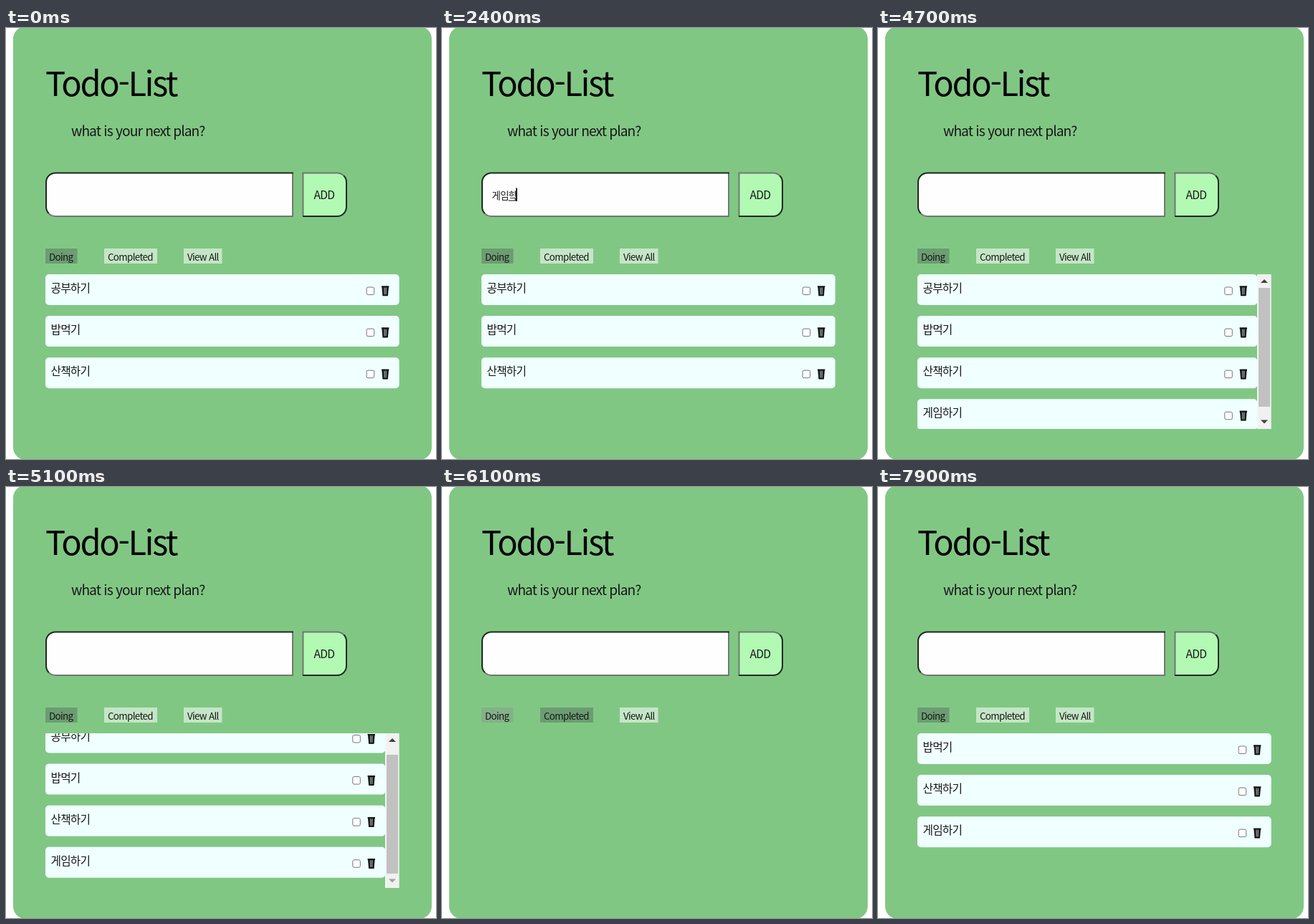
Write an HTML page that moves like this. It is 600 px wide and 602 px high and loops after 8 s.

```html
<!DOCTYPE html>
<html lang="ko">
<head>
<meta charset="utf-8">
<style>
html, body { margin: 0; width: 100%; height: 100%; overflow: hidden; background: #fff; }
svg { display: block; width: 600px; height: 602px; }
text {
  font: 300 15.7px "Noto Sans CJK KR", "Noto Sans KR", "Noto Sans CJK JP", "Noto Sans", sans-serif;
  letter-spacing: -.05em; fill: #181818; white-space: pre;
}
.title { font-size: 47px; font-weight: 400; fill: #050505; }
.sub { font-size: 19.2px; }
.tab, #typed { font-size: 13.4px; }
.line { fill: none; stroke-width: 2; }
.dark { stroke: #1c2a1d; }
.soft { stroke: #707870; }
</style>
</head>
<body>
<svg viewBox="0 0 600 602">
  <defs>
    <clipPath id="view"><rect x="50" y="344" width="500" height="216"/></clipPath>
    <filter id="blur" x="-5%" y="-200%" width="110%" height="500%"><feGaussianBlur stdDeviation="1.1"/></filter>
    <g id="tools">
      <rect x="-45.5" y="18" width="10.5" height="10.5" rx="2" fill="#fff" stroke="#767676"/>
      <path d="M-24.5 16.5H-14.5L-15.7 30H-23.3Z" fill="#3c423f"/>
      <path d="M-24.7 17.3H-14.3M-23 29.5H-16M-23 18L-22 29M-16 18L-17 29" stroke="#0c0f0d" stroke-width="1.6"/>
      <path d="M-20.6 19V28M-18.4 19V28" stroke="#a9b5b1" stroke-width=".8"/>
    </g>
  </defs>

  <rect x="10" y="-2" width="584" height="605" rx="17" fill="#81c784"/>
  <path d="M203 -1H393" stroke="#182018" stroke-width="4" stroke-dasharray="21 2 9 2 14 1" filter="url(#blur)"/>
  <text class="title" x="55" y="95">Todo-List</text>
  <text class="sub" x="91" y="151">what is your next plan?</text>

  <path d="M401 202V264H69A13 13 0 0 1 56 250V215A13 13 0 0 1 69 202Z" fill="#fffefe"/>
  <path class="line soft" d="M400 203V263H69A13 13 0 0 1 59.8 259.2"/>
  <path class="line dark" d="M59.8 259.2A13 13 0 0 1 56 250V215.5A13 13 0 0 1 69 202.5H401"/>
  <path d="M414 202H462A13 13 0 0 1 475 215V250A13 13 0 0 1 462 263H414Z" fill="#b2fab4"/>
  <path class="line soft" d="M414.5 263V202.5H462A13 13 0 0 1 471.2 206.3"/>
  <path class="line dark" d="M471.2 206.3A13 13 0 0 1 475 215.5V250A13 13 0 0 1 462 263H414"/>
  <text x="429.5" y="239">ADD</text>

  <text id="typed" x="69.5" y="238.5"></text>
  <rect id="under" y="240.5" width="11" height="1" fill="#111"/>
  <rect id="caret" y="223.5" width="1.7" height="18.5" fill="#000"/>

  <rect id="doing" x="55" y="308" width="44.5" height="21"/>
  <rect id="done" x="137" y="308" width="74" height="21"/>
  <rect x="248" y="308" width="53.5" height="21" fill="#c5e6c6"/>
  <text class="tab" x="60" y="324.8">Doing</text>
  <text class="tab" x="142" y="324.8">Completed</text>
  <text class="tab" x="253" y="324.8">View All</text>

  <g clip-path="url(#view)"><g id="list"></g></g>
  <g id="bar">
    <rect x="529.3" y="344" width="19.4" height="216" fill="#f1f1f1"/>
    <path d="M529.8 344V560" stroke="#fff"/>
    <rect id="thumb" x="531" width="16" height="166" fill="#c1c1c1"/>
    <path id="up" d="M534 356L539 351L544 356Z"/>
    <path id="down" d="M534 547.5L539 552.5L544 547.5Z"/>
  </g>
</svg>
<script>
const LOOP = 8000, ADD = 2900, BLUR = 4600, EMPTY = 6000, BACK = 6500, REMOVE = 7500;
const PLANS = ["공부하기", "밥먹기", "산책하기", "게임하기"];
const KEYS = [[1150, "ㄱ"], [1350, "게"], [1530, "겡"], [1700, "게이"], [1850, "게임"],
  [2050, "게임ㅎ"], [2200, "게임하"], [2400, "게임학"], [2550, "게임하기"]];
const DARK = [108, 157, 114], LIGHT = [197, 230, 198];
const FOCUS = 700, MAX_SCROLL = 15.5, PITCH = 58.1, FADE = 370, CHAR = 11.6;

const $ = id => document.getElementById(id);
const set = (id, name, value) => $(id).setAttribute(name, value);
const show = (id, on) => set(id, "visibility", on ? "visible" : "hidden");
const ramp = (t, start, length) => Math.min(1, Math.max(0, (t - start) / length));
const shade = k => `rgb(${DARK.map((c, i) => Math.round(c + (LIGHT[i] - c) * k))})`;

function drawInput(t) {
  const key = KEYS.filter(([at]) => at <= t).pop();
  const word = key && t < ADD ? key[1] : "";
  $("typed").textContent = word;
  set("caret", "x", 69 + word.length * CHAR - (word ? .6 : 0));
  set("under", "x", 69.5 + (word.length - 1) * CHAR);
  show("under", word);

  // The caret restarts its blink at each key press.
  const since = t - (t >= ADD ? ADD : key ? key[0] : FOCUS);
  show("caret", t >= FOCUS && t < BLUR && since % 1000 < 500);
}

function drawTabs(t) {
  set("doing", "fill", shade(ramp(t, EMPTY, FADE) - ramp(t, BACK - 100, 300)));
  set("done", "fill", shade(1 - ramp(t, 5650, 350) + ramp(t, BACK, FADE)));
}

let drawn = "";
function drawList(t) {
  const empty = t >= EMPTY && t < BACK;
  const plans = empty ? [] : PLANS.slice(t >= REMOVE ? 1 : 0, t >= ADD ? 4 : 3);
  const full = plans.length > 3;
  const k = t < EMPTY ? ramp(t, 4700, 150) : 0;
  const scroll = k * k * (3 - 2 * k);
  const width = full ? 474.3 : 493.7;

  const state = plans.join();
  if (state !== drawn) {
    $("list").innerHTML = plans.map((plan, i) => `<g transform="translate(55 ${344 + i * PITCH})">
      <rect width="${width}" height="43" rx="5" fill="#f0ffff"/>
      <text x="7.5" y="25">${plan}</text><use href="#tools" x="${width}"/></g>`).join("");
    drawn = state;
  }
  set("list", "transform", `translate(0 ${-MAX_SCROLL * scroll})`);
  show("bar", full);
  set("thumb", "y", 363 + 11 * scroll);
  set("up", "fill", scroll > 0 ? "#404040" : "#a0a0a0");
  set("down", "fill", scroll < 1 ? "#404040" : "#a0a0a0");
}

function frame(now) {
  const t = now % LOOP;
  drawInput(t);
  drawTabs(t);
  drawList(t);
  requestAnimationFrame(frame);
}
frame(0);
</script>
</body>
</html>
```
